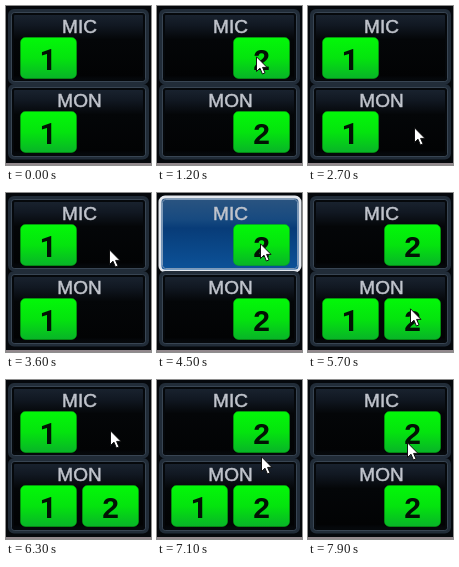
An HTML page for the animation above (8000 ms loop, 145 by 159 pixels).

```html
<!DOCTYPE html>
<html lang="en">
<head>
<meta charset="utf-8">
<title>Transmit selector</title>
<style>
html, body { margin: 0; width: 100%; height: 100%; overflow: hidden; background: #05080c; }
svg { display: block; width: 100%; height: 100%; }
text { font-family: "Liberation Sans", Arial, sans-serif; text-anchor: middle; }
.label { font-size: 19px; fill: #c0c4cc; stroke: #c0c4cc; stroke-width: .5px; }
.digit { font-size: 30px; font-weight: bold; fill: #021204; }
.one { font-family: Roboto, sans-serif; }

/* Every change is a hard step on a 100 ms grid: 1.25% of the loop. */
.timed { animation: 8s step-end infinite; }
#mic-press { animation-name: mic-press; }
#mon-press { animation-name: mon-press; }
#mic-1 { animation-name: mic-1; }
#mic-2 { animation-name: mic-2; }
#mon-1 { animation-name: mon-1; }
#mon-2 { animation-name: mon-2; }
#pointer { animation-name: pointer; }

@keyframes mic-press {
  0%, 15%, 25%, 48.75%, 57.5%, 66.25%, 78.75%, 87.5%, 100% { opacity: 0; }
  13.75%, 23.75%, 47.5%, 56.25%, 65%, 77.5%, 86.25% { opacity: 1; }
}
@keyframes mon-press {
  0%, 37.5%, 95%, 100% { opacity: 0; }
  36.25%, 93.75% { opacity: 1; }
}
@keyframes mic-1 {
  0%, 25%, 57.5%, 78.75% { opacity: 1; }
  15%, 48.75%, 66.25%, 87.5%, 100% { opacity: 0; }
}
@keyframes mic-2 {
  0%, 25%, 57.5%, 78.75% { opacity: 0; }
  15%, 48.75%, 66.25%, 87.5%, 100% { opacity: 1; }
}
@keyframes mon-1 {
  0%, 25%, 57.5%, 71.25% { opacity: 1; }
  15%, 48.75%, 66.25%, 95%, 100% { opacity: 0; }
}
@keyframes mon-2 {
  0%, 25%, 57.5% { opacity: 0; }
  15%, 48.75%, 66.25%, 100% { opacity: 1; }
}
@keyframes pointer {
  0% { transform: translate(160px, 53px); }
  6.25% { transform: translate(133px, 53px); }
  7.5% { transform: translate(100px, 52px); }
  13.75% { transform: translate(99px, 50px); }
  28.75% { transform: translate(98px, 60px); }
  30% { transform: translate(99px, 82px); }
  31.25% { transform: translate(102px, 104px); }
  32.5% { transform: translate(105px, 117px); }
  33.75% { transform: translate(106px, 121px); }
  41.25% { transform: translate(106px, 112px); }
  42.5% { transform: translate(105px, 92px); }
  43.75% { transform: translate(104px, 70px); }
  45% { transform: translate(103px, 56px); }
  46.25% { transform: translate(103px, 50px); }
  67.5% { transform: translate(103px, 84px); }
  68.75% { transform: translate(102px, 115px); }
  73.75% { transform: translate(102px, 100px); }
  75% { transform: translate(103px, 74px); }
  76.25% { transform: translate(104px, 50px); }
  88.75% { transform: translate(104px, 76px); }
  90% { transform: translate(103px, 108px); }
  91.25% { transform: translate(102px, 130px); }
  97.5% { transform: translate(101px, 98px); }
  98.75%, 100% { transform: translate(99px, 62px); }
}
</style>
</head>
<body>
<svg viewBox="0 0 145 159" preserveAspectRatio="none">
  <defs>
    <linearGradient id="glass" x2="0" y2="1">
      <stop offset="0" stop-color="#1c2633"/>
      <stop offset=".2" stop-color="#111822"/>
      <stop offset=".4" stop-color="#040608"/>
      <stop offset=".9" stop-color="#020304"/>
      <stop offset="1" stop-color="#080d13"/>
    </linearGradient>
    <linearGradient id="blue" x2="0" y2="1">
      <stop offset="0" stop-color="#2c5580"/>
      <stop offset=".3" stop-color="#174a80"/>
      <stop offset=".42" stop-color="#083c78"/>
      <stop offset="1" stop-color="#0c539a"/>
    </linearGradient>
    <linearGradient id="green" x2="0" y2="1">
      <stop offset="0" stop-color="#03f808"/>
      <stop offset=".5" stop-color="#04e40e"/>
      <stop offset="1" stop-color="#08b428"/>
    </linearGradient>
    <g id="panel">
      <rect x="4" y="5" width="137" height="71.5" rx="4" fill="url(#glass)" stroke="#212c38" stroke-width="4"/>
      <rect x="5.5" y="6.5" width="134" height="69" rx="3" fill="none" stroke="#384553"/>
      <rect x="7" y="8" width="131" height="66" rx="2" fill="none" stroke="#05080b" stroke-width="2"/>
    </g>
    <g id="pressed">
      <rect x="3" y="4" width="140" height="74" rx="5" fill="url(#blue)" stroke="#e4e8ee" stroke-width="3"/>
      <rect x="5.5" y="6.5" width="135" height="69" rx="3" fill="none" stroke="#7e9ab8"/>
    </g>
    <rect id="key" x=".5" y=".5" width="56" height="41" rx="5" fill="url(#green)" stroke="#06b010" stroke-opacity=".5"/>
  </defs>

  <rect width="145" height="159" fill="#05080c"/>
  <rect y="157" width="145" height="2" fill="#92898d"/>

  <g>
    <use href="#panel"/>
    <use id="mic-press" class="timed" href="#pressed"/>
    <text class="label" x="73.5" y="26.5">MIC</text>
    <g id="mic-1" class="timed">
      <use href="#key" x="14" y="31"/>
      <text class="digit one" x="42" y="64">1</text>
    </g>
    <g id="mic-2" class="timed">
      <use href="#key" x="76" y="31"/>
      <text class="digit" x="104.5" y="63.5">2</text>
    </g>
  </g>

  <g>
    <use href="#panel" y="75"/>
    <use id="mon-press" class="timed" href="#pressed" y="77"/>
    <text class="label" x="73.5" y="100.5">MON</text>
    <g id="mon-1" class="timed">
      <use href="#key" x="14" y="105"/>
      <text class="digit one" x="42" y="138">1</text>
    </g>
    <g id="mon-2" class="timed">
      <use href="#key" x="76" y="105"/>
      <text class="digit" x="104.5" y="137.5">2</text>
    </g>
  </g>

  <path id="pointer" class="timed" fill="#fff" stroke="#111"
    d="M.5 .8V15.5L4 12.2L6.4 18L9 16.9L6.6 11.4H11Z"/>
</svg>
</body>
</html>
```
